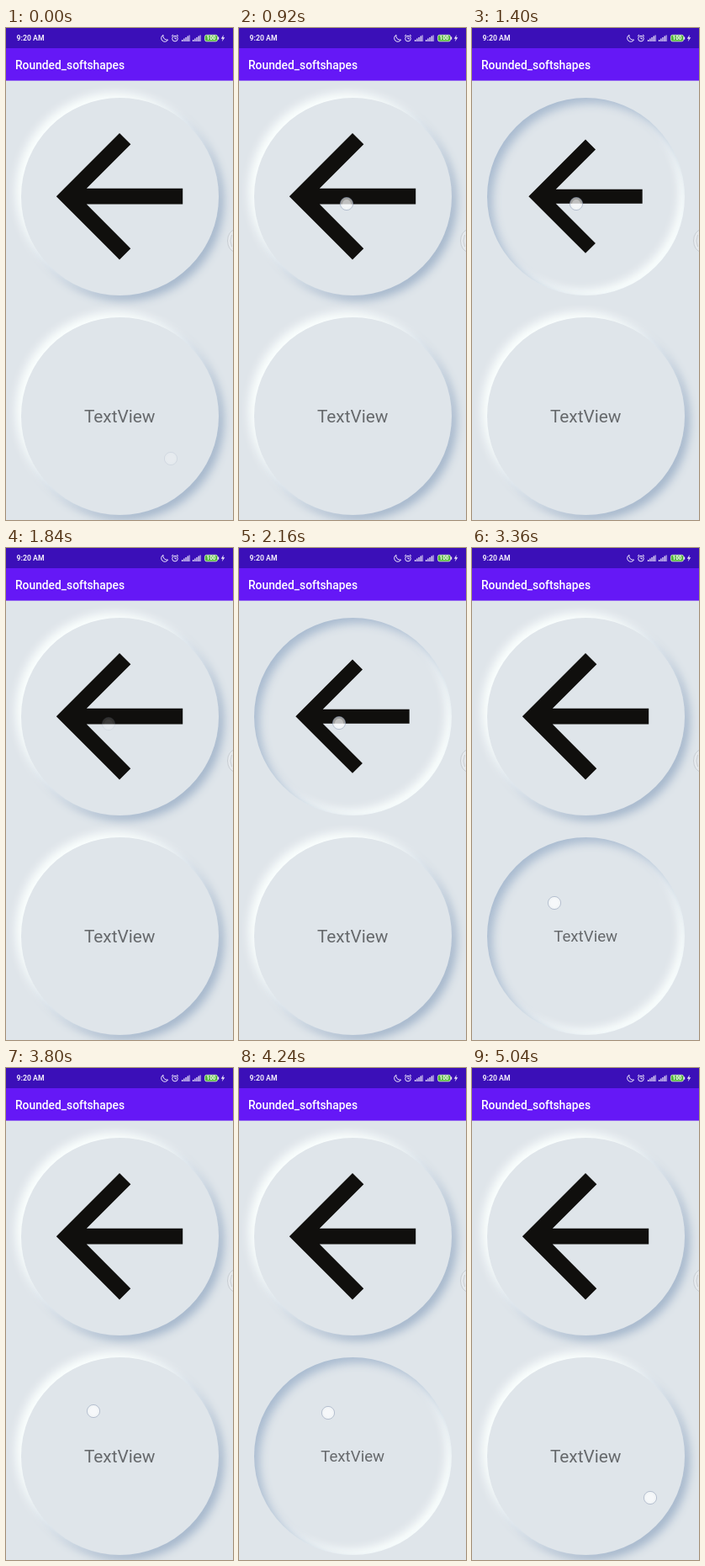
Animation of 270x585 px, one loop 5.08 s. Source, as an HTML page:

```html
<!DOCTYPE html>
<html lang="en">
<head>
<meta charset="utf-8">
<title>Soft buttons</title>
<style>
  html, body { margin: 0; width: 100%; height: 100%; overflow: hidden; background: #dfe5ea; }
  body { position: relative; font-family: Roboto, sans-serif; }
  .button {
    position: absolute; left: 17.5px; width: 235px; height: 235px; border-radius: 50%;
    background: #dfe5ea;
    box-shadow: -6px -6px 11px #fbfffe, 6px 6px 11px #a5b7cc;
  }
  .button.pressed { box-shadow: inset 6px 6px 11px #a9bbd0, inset -6px -6px 11px #fbfffe; }
  #top { top: 82.5px; }
  #bottom { top: 344px; }
  svg { position: absolute; left: 0; top: 0; }
</style>
</head>
<body>
<div class="button" id="top"></div>
<div class="button" id="bottom"></div>
<svg width="270" height="585" viewBox="0 0 270 585">
  <rect y="24" width="270" height="38.6" fill="#6518f6"/>
  <rect width="270" height="24" fill="#3b0fb8"/>
  <text x="11" y="48.5" font-size="13.8" font-weight="500" fill="#fff">Rounded_softshapes</text>

  <g fill="#eee9fb">
    <text x="12.5" y="15.3" font-size="8.7" font-weight="700">9:20 AM</text>
    <path d="M187 8.3A4.2 4.2 0 1 0 192.6 14A4.7 4.7 0 0 1 187 8.3Z" fill="none" stroke="#eee9fb"/>
    <g fill="none" stroke="#eee9fb">
      <circle cx="201" cy="12.6" r="3.3"/>
      <path d="M201 10.5V12.8H202.8M196.9 9.7L199 8M205.1 9.7L203 8"/>
    </g>
    <g id="signal"><path d="M209 14h1.3v2h-1.3zM211.2 12.5h1.3v3.5h-1.3zM213.4 11h1.3v5h-1.3zM215.6 9.5h1.3v6.5h-1.3zM217.6 8.5h1v7.5h-1z"/></g>
    <use href="#signal" x="13"/>
    <rect x="236.5" y="8.3" width="15" height="7.6" rx="2" fill="#55b83c" stroke="#d8eecf" stroke-width=".8"/>
    <rect x="252" y="10.5" width="1.2" height="3.2"/>
    <text x="244" y="14.4" font-size="6.3" font-weight="700" text-anchor="middle" fill="#fff">100</text>
    <path d="M258.8 8L255.8 12.7H257.8L256.8 16.2L260.3 11.3H258.2Z"/>
  </g>

  <g id="arrow">
    <path transform="translate(135 200.2) scale(9.4) translate(-12 -12)" fill="#100f0d"
      d="M20 11H7.83l5.59-5.59L12 4l-8 8 8 8 1.41-1.41L7.83 13H20z"/>
  </g>
  <g id="label">
    <text x="135.2" y="469" font-size="20.8" text-anchor="middle" fill="#66696c">TextView</text>
  </g>

  <ellipse cx="272.5" cy="253" rx="9" ry="13" fill="#e5e9ed" stroke="#c3c8cd" stroke-width=".8"/>
  <path d="M268.5 246Q265.5 253 268.5 260" fill="none" stroke="#c3c8cd" stroke-width=".8"/>

  <g id="touch">
    <circle r="7.6" fill="#fff" fill-opacity=".6" stroke="#8d9bb5" stroke-opacity=".55"/>
    <circle r="5" fill="#fff" fill-opacity=".35"/>
  </g>
</svg>
<script>
  const LOOP = 5080, STEP = 40;
  const [topButton, bottomButton, arrow, label, touch] =
    ["top", "bottom", "arrow", "label", "touch"].map(id => document.getElementById(id));

  // The button is pressed from start to release; the touch mark fades out up to end.
  const tapTop = (start, release, x, y) =>
    ({ button: topButton, x, y, start, release, fade: release + 40, end: release + 200 });
  const tapBottom = (start, release, end, x, y) =>
    ({ button: bottomButton, x, y, start, release, fade: end, end });
  const mark = (start, fade, end, x, y) => ({ x, y, start, fade, end });

  const taps = [
    mark(-160, -120, 40, 196, 512),
    tapTop(40, 120, 131, 209),
    tapTop(320, 400, 130, 209),
    tapTop(760, 880, 128, 209),
    tapTop(1080, 1160, 126, 209),
    tapTop(1360, 1440, 124, 209),
    tapTop(1640, 1680, 122, 209),
    tapTop(2040, 2280, 119, 208),
    tapBottom(3000, 3040, 3040, 98, 422),
    tapBottom(3320, 3440, 3480, 98, 422),
    tapBottom(3720, 3800, 3840, 104, 408),
    tapBottom(4240, 4280, 4280, 106, 410),
    mark(4600, 4720, 4880, 210.5, 509.5),
    mark(5040, 5080, 5080, 212, 511)
  ];
  taps[0].end = 60;

  function setPressed(button, content, cy, pressed) {
    button.classList.toggle("pressed", pressed);
    content.setAttribute("transform", pressed
      ? `translate(135 ${cy}) scale(.9) translate(-135 ${-cy})` : "");
  }

  function draw() {
    const t = Math.floor(performance.now() % LOOP / STEP) * STEP;
    const tap = taps.findLast(p => t >= p.start && t < p.end);
    const held = tap && t < tap.release ? tap.button : null;
    setPressed(topButton, arrow, 200, held === topButton);
    setPressed(bottomButton, label, 461.5, held === bottomButton);

    touch.setAttribute("opacity", !tap ? 0 : t < tap.fade ? 1 : (tap.end - t) / (tap.end - tap.fade));
    if (tap) touch.setAttribute("transform", `translate(${tap.x} ${tap.y})`);
    requestAnimationFrame(draw);
  }
  draw();
</script>
</body>
</html>
```
